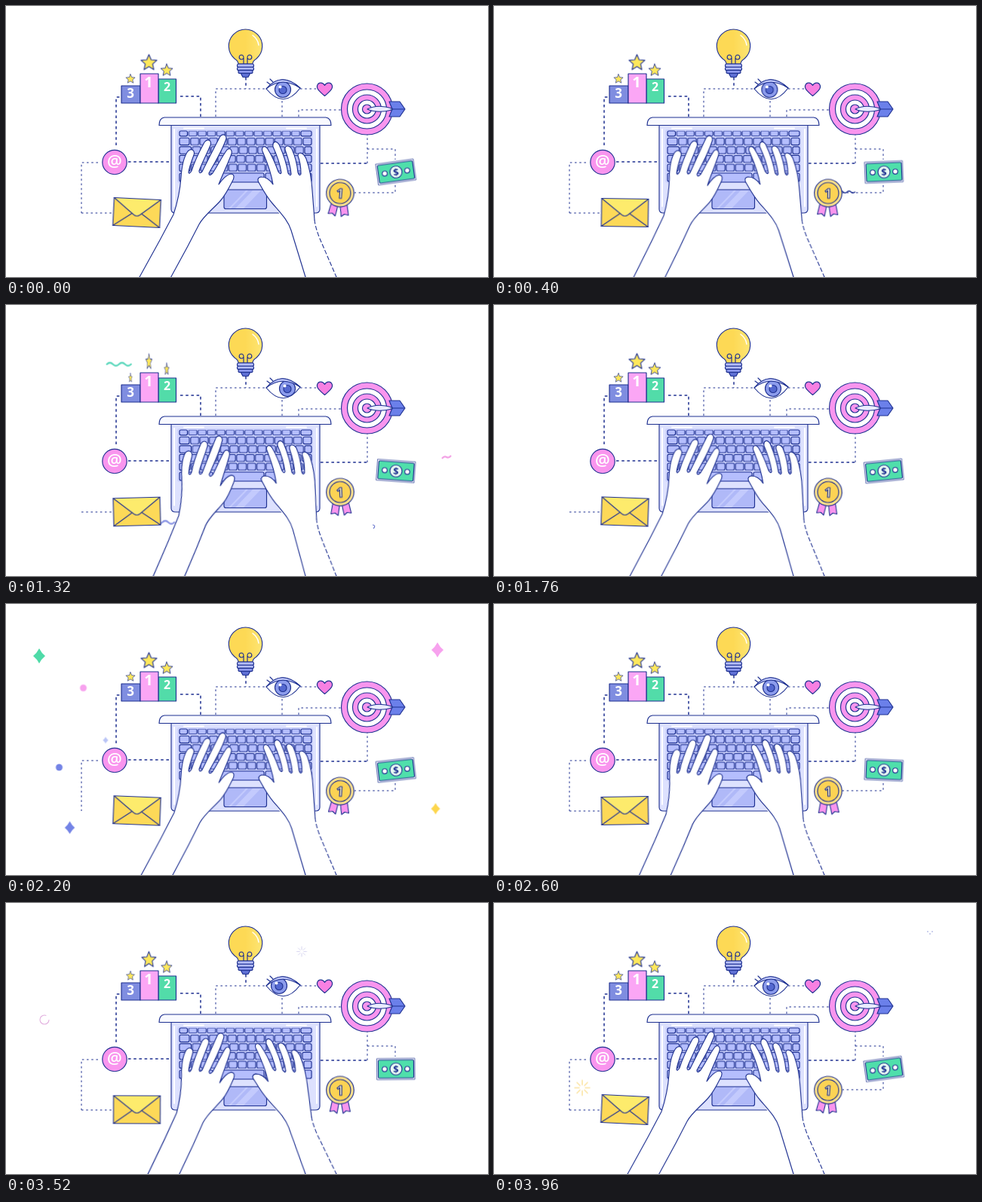
An HTML page without scripts that plays this animation: 639x360 px, repeating every 4000 ms.

```html
<!DOCTYPE html>
<html lang="en">
<head>
<meta charset="utf-8">
<title>Typing hands</title>
<style>
html, body { margin: 0; width: 100%; height: 100%; overflow: hidden; background: #fff; }
svg { display: block; width: 100%; height: 100%; --ink: #1f3191; }
.ink { stroke: var(--ink); stroke-width: 1.15; stroke-linejoin: round; stroke-linecap: round; }
.line { fill: none; }
text { font-family: "Open Sans", "Noto Sans", sans-serif; font-weight: 700; text-anchor: middle; fill: #fff; }

/* dashed connectors */
.dash { fill: none; stroke: var(--ink); stroke-width: 1; stroke-dasharray: 2.6 3.6; }
.bold { stroke-width: 1.5; stroke-dasharray: 3.6 3.6; }
.flick { animation: 4s step-end infinite; }
.fa { animation-name: fa; }
.fb { animation-name: fb; }
.fc { animation-name: fc; }
.fd { animation-name: fd; }
@keyframes fa { 0%, 45%, 84% { opacity: 1 } 27%, 68% { opacity: 0 } }
@keyframes fb { 0%, 62% { opacity: 1 } 50% { opacity: 0 } }
@keyframes fc { 0%, 70% { opacity: 1 } 28% { opacity: 0 } }
@keyframes fd { 0%, 50%, 95% { opacity: 1 } 28%, 84% { opacity: 0 } }

/* swaying icons: from --a to its opposite and back */
.sway { animation: sway 1s cubic-bezier(.37, 0, .63, 1) infinite alternate; }
@keyframes sway { from { transform: rotate(var(--a)) } to { transform: rotate(calc(-1 * var(--a))) } }

.star { transform-box: fill-box; transform-origin: center; fill: #fde85c; animation: spin 2s linear infinite; }
@keyframes spin { 0%, 58.5% { transform: rotateY(0) } 79%, 100% { transform: rotateY(180deg) } }

/* hands lean: the left one slides its forearm, the right one keeps it still */
.left { transform-origin: 258px 219px; animation: left 1s cubic-bezier(.37, 0, .63, 1) infinite alternate; }
@keyframes left { to { transform: translateY(4px) skewX(8.9deg) } }
.right { transform-origin: 410px 360px; animation: right 4s ease-in-out infinite; }
@keyframes right {
  0%, 100% { transform: none }
  19% { transform: skewX(1deg) }
  33% { transform: skewX(-2deg) }
  55%, 76% { transform: skewX(-.6deg) }
  88% { transform: skewX(3deg) }
}
.iris { animation: look 4s ease-in-out infinite; }
@keyframes look {
  0%, 55%, 76%, 100% { transform: none }
  19% { transform: translateX(-3px) }
  33% { transform: translateX(6px) }
  88% { transform: translate(-5px, -1px) }
}

/* sparks: --t is the moment of full size, --x --y the starting offset */
.pop, .glide { opacity: 0; animation: pop 4s ease-out infinite; animation-delay: calc(var(--t) * 1ms - 4400ms); }
.glide { animation-name: glide; animation-timing-function: linear; animation-delay: calc(var(--t) * 1ms - 4700ms); }
@keyframes pop {
  0% { opacity: 0; transform: translate(var(--x, 0), var(--y, 0)) scale(.2) }
  3% { opacity: 1 }
  10%, 11% { opacity: 1; transform: none }
  11.1%, 100% { opacity: 0; transform: none }
}
@keyframes glide {
  0% { opacity: 1; transform: translate(var(--x, 0), var(--y, 0)) }
  17.5% { opacity: 1; transform: none }
  19% { opacity: 0; transform: none }
  100% { opacity: 0 }
}
</style>
</head>
<body>
<svg viewBox="0 0 639 360" preserveAspectRatio="none">
<defs>
  <pattern id="keys" width="12.4" height="20" patternUnits="userSpaceOnUse">
    <rect x=".8" y=".6" width="10.8" height="9.4" rx="2" fill="#b5befd" stroke="#1f3191" stroke-width="1.1"/>
  </pattern>
  <rect id="row" width="148.8" height="11" fill="url(#keys)"/>
  <path id="star" d="M0-11 3-4 10.5-3.4 4.9 1.6 6.5 9 0 5-6.5 9-4.9 1.6-10.5-3.4-3-4Z"/>
  <path id="gem" d="M0-10Q3-4 8 0Q3 4 0 10Q-3 4-8 0Q-3-4 0-10Z"/>
  <path id="wave" d="M-16 0q4-4 8 0t8 0 8 0 8 0" fill="none" stroke-width="2.4" stroke-linecap="round"/>
  <path id="rays" d="M0-4V-10M0 4V10M-4 0H-10M4 0H10M-3-3-7-7M3 3 7 7M3-3 7-7M-3 3-7 7" stroke-width="1.5" stroke-linecap="round"/>
  <path id="ribbon" class="ink" d="M1 14 4 31 8 27.5 13.5 28.500 10 12Z" fill="#f995ee"/>
  <linearGradient id="glass"><stop offset=".5" stop-color="#fdd955"/><stop offset="1" stop-color="#fde573"/></linearGradient>
</defs>
<rect width="639" height="360" fill="#fff"/>

<!-- connectors -->
<path class="dash bold" d="M146 185V121H154M231 120H258V148M162 207H217M318 95V110M417 209H479"/>
<path class="dash" d="M278 147V110H345M390 110H411M366 126V147M388 147V138H445M479 209V171"/>
<path class="dash flick fa" d="M122 208H100V275"/>
<path class="dash flick fb" d="M100 275H141"/>
<path class="dash flick fc" d="M479 190H516V204"/>
<path class="dash flick fd" d="M516 238V248H462"/>

<!-- gliding squiggles -->
<g transform="translate(584 202)"><path class="glide line" style="--t:1320; --x:-45px" d="M-6 2q3-4 6-2t6-2" stroke="#f3a2e6" stroke-width="2.200"/></g>
<g transform="translate(149 78)"><g class="glide" style="--t:1340; --x:26px; --y:24px"><use href="#wave" stroke="#5ed8bd"/></g></g>
<g transform="translate(208 289)"><g class="glide" style="--t:1340; --x:-30px; --y:-12px"><use href="#wave" stroke="#8c96e4"/></g></g>
<g transform="translate(484 247)"><g class="glide" style="--t:800; --x:-28px"><use href="#wave" transform="scale(.65 .6)" stroke="#1f3191"/></g></g>
<path class="pop line" style="--t:1310" d="M486 292q5 1 1 5" stroke="#6f7ccf" stroke-width="1.200"/>

<!-- laptop -->
<path class="ink" d="M219 157H416V270Q416 275 410 275H225Q219 275 219 270Z" fill="#dde1fe"/>
<path class="line" d="M223 164V266M412 164V266M236 162.500H262M372 162.500H398" stroke="#fff" stroke-width="2" stroke-linecap="round"/>
<path class="ink" d="M210 148H424Q431 149 431 158.500H203Q203 149 210 148Z" fill="#f8f9ff"/>
<rect x="227" y="164" width="180" height="71" rx="3" fill="#ced4fe"/>
<g class="ink" fill="#b5befd">
  <rect x="230" y="166" width="10.500" height="6.800" rx="2"/><rect x="391" y="166" width="14" height="6.800" rx="2"/>
  <rect x="230" y="175.200" width="13" height="9.400" rx="2"/><rect x="394" y="175.200" width="11" height="9.400" rx="2"/>
  <rect x="230" y="186.800" width="15.500" height="9.400" rx="2"/><rect x="396" y="186.800" width="9" height="9.400" rx="2"/>
  <rect x="230" y="198.400" width="12" height="9.400" rx="2"/><rect x="393" y="198.400" width="12" height="9.400" rx="2"/>
  <rect x="230" y="210" width="14" height="9.400" rx="2"/><rect x="395" y="210" width="10" height="9.400" rx="2"/>
  <rect x="230" y="222" width="18" height="11" rx="2"/><rect x="250" y="222" width="24" height="11" rx="2"/>
  <rect x="276" y="222" width="66" height="12" rx="2"/><rect x="344" y="222" width="24" height="11" rx="2"/>
  <rect x="370" y="222" width="35" height="11" rx="2"/>
</g>
<use href="#row" transform="translate(241.400 165.600) scale(1 .72)"/>
<use href="#row" transform="translate(244 174.600)"/>
<use href="#row" transform="translate(246.400 186.200)"/>
<use href="#row" transform="translate(243 197.800)"/>
<use href="#row" transform="translate(245 209.400)"/>
<rect class="ink" x="289" y="244" width="56.500" height="25.500" rx="2.500" fill="#b0b9f8"/>
<path d="M304 269 327 245H338L315 269ZM295 269 318 245H321L298 269Z" fill="#c3cafd"/>

<!-- bulb -->
<g class="ink">
  <path d="M308 77Q308 73 303 70A22.200 22.200 0 1 1 332 70Q327 73 327 77Z" fill="url(#glass)"/>
  <path class="line" d="M315 77V69M320 77V69M315 69a3 3 0 1 1-3-4q3 0 3 4M320 69a3 3 0 1 0 3-4q-3 0-3 4"/>
  <path class="line" d="M327 39q7 5 8 13" style="stroke:#fff; stroke-width:1.500"/>
  <path d="M311 89H324L321 94.500H314Z" fill="#5f70d4"/>
  <rect x="306.500" y="77" width="22" height="4.200" rx="2" fill="#b5befd"/>
  <rect x="306.500" y="81.200" width="22" height="4.200" rx="2" fill="#b5befd"/>
  <rect x="308" y="85.400" width="19" height="4" rx="2" fill="#8e9af0"/>
</g>

<!-- podium -->
<g class="ink">
  <rect x="153" y="106" width="25" height="23" fill="#7f8de0"/>
  <rect x="202" y="97" width="23.500" height="32" fill="#52dca9"/>
  <rect x="178" y="90" width="24" height="39" fill="#fba6f5"/>
  <g transform="translate(189.500 75.500)"><use href="#star" class="star"/></g>
  <g transform="translate(165 97) scale(.58)"><use href="#star" class="star"/></g>
  <g transform="translate(213 85.500) scale(.76)"><use href="#star" class="star"/></g>
</g>
<text x="165" y="122" font-size="17">3</text>
<text x="189" y="108" font-size="20">1</text>
<text x="213.500" y="113" font-size="16">2</text>

<!-- at sign -->
<circle class="ink" cx="144" cy="207.500" r="16.200" fill="#f995ee"/>
<text x="144" y="213.500" font-size="22" font-weight="400" style="font-weight:600">@</text>

<!-- eye -->
<g class="ink">
  <path d="M345 110Q365 86 390 109Q368 138 345 110Z" fill="#fff"/>
  <g class="iris">
    <circle cx="367" cy="111" r="10.500" fill="#8c9cec"/>
    <circle cx="367" cy="111.500" r="5" fill="#5468d0"/>
    <circle cx="363.500" cy="107.500" r="2" fill="#fff" stroke="none"/>
  </g>
  <path d="M345 110Q365 86 390 109Q366 93 345 110Z" fill="#c0c8fb"/>
  <path class="line" d="M350 104 346 101M354 101 350 97"/>
</g>

<!-- heart -->
<path class="ink" d="M422.500 119.500C416 114 411.500 110 412.500 106C414 101 420 101 422.500 105.500C425 101 431 101 432.500 106C433.500 110 429 114 422.500 119.500Z" fill="#f880e2"/>

<!-- target -->
<g class="ink" fill="#f995ee">
  <circle cx="478.500" cy="137" r="34"/>
  <circle cx="478.500" cy="137" r="26" fill="#fff"/>
  <circle cx="478.500" cy="137" r="19"/>
  <circle cx="478.500" cy="137" r="12" fill="#fff"/>
  <circle cx="478.500" cy="137" r="6"/>
  <path d="M512 137 508 127H522L529 137 522 147H508Z" fill="#6b80ea"/>
  <path d="M479 137Q492 130 512 136V138Q492 143 479 137Z" fill="#e9ecff"/>
  <path class="line" d="M510 137H528"/>
</g>

<!-- banknote -->
<g transform="translate(517 220.500)"><g class="sway" style="--a:-7.800deg">
  <rect class="ink line" x="-25" y="-14" width="50" height="28" style="stroke-width:.7"/>
  <rect class="ink" x="-23.500" y="-12" width="47" height="24" rx="1.500" fill="#4fdfab"/>
  <circle class="ink" r="8" fill="#e9fbf4"/>
  <circle class="ink" cx="-15" r="3.300" fill="#fff"/>
  <circle class="ink" cx="15" r="3.300" fill="#fff"/>
  <text y="4.700" font-size="13" style="fill:var(--ink)">$</text>
</g></g>

<!-- medal -->
<g transform="translate(443 248.500)"><g class="sway" style="--a:5deg">
  <use href="#ribbon"/><use href="#ribbon" transform="scale(-1 1)"/>
  <circle class="ink" r="18.300" fill="#fde28c"/>
  <circle class="ink" r="14" fill="#fcd354"/>
  <text class="ink" y="6.500" font-size="18" style="fill:#fdeeb4">1</text>
</g></g>

<!-- envelope -->
<g transform="translate(173.500 274.500)"><g class="sway" style="--a:2.800deg">
  <rect class="ink" x="-31" y="-18.500" width="62" height="37" fill="#fdd958"/>
  <path class="ink line" d="M-31 18.500-6 1M31 18.500 6 1"/>
  <path class="ink" d="M-31-18.500-4 3Q0 6 4 3L31-18.500Z" fill="#fdeb6c"/>
</g></g>

<!-- hands -->
<g class="left">
  <path class="ink" fill="#fff" d="M155 400 204 311 222 277C227 262 231 242 232 228C233 212 236 200 241 193C246 188 251 192 249 198C246 206 243 214 242 221Q243 224 246 219C250 206 257 192 263 181C268 175 273 179 271 185C266 197 260 208 256 219Q256 224 260 220C267 206 276 188 284 173C289 168 294 173 291 179C286 193 277 208 269 222Q269 227 274 222C281 211 287 199 293 191C298 187 301 193 298 199C293 212 287 224 282 237C287 230 293 224 298 223C303 223 303 228 300 233C295 243 291 251 284 259C274 270 262 279 256 290L241 319 197 400"/>
</g>
<g class="right">
  <path fill="#fff" d="M452 400 438 360 410 290 400 240 360 250 353 262 377 297 409 400Z"/>
  <path class="ink" fill="#fff" d="M409 284 406 245C405 228 402 214 398 203C394 194 387 193 387 199C390 207 391 215 391 223Q389 227 387 221C386 210 383 199 379 190C375 184 369 185 370 191C374 202 377 212 378 223Q377 227 374 222C372 209 367 195 362 184C358 178 353 180 354 187C359 198 363 209 365 221Q364 225 361 220C357 209 352 198 347 190C343 184 338 187 340 193C345 205 351 218 354 237C350 231 344 227 338 227C333 228 333 232 336 236C341 245 346 254 353 262C364 275 374 285 378 298L397 360 409 400"/>
  <path class="line" d="M409 284Q410 294 416 309L438 360 446 380" stroke="#1f3191" stroke-width="1.100" stroke-dasharray="6 2.500"/>
</g>

<!-- gems and dots -->
<g transform="translate(44 69)"><use href="#gem" class="pop" style="--t:2200; --x:50px; --y:15px" fill="#4fdba8"/></g>
<g transform="translate(572 61)"><use href="#gem" class="pop" style="--t:2200; --x:-40px; --y:30px" fill="#f7a2ee"/></g>
<g transform="translate(569.500 272) scale(.75)"><use href="#gem" class="pop" style="--t:2200; --x:-50px; --y:-30px" fill="#fdd64d"/></g>
<g transform="translate(84.500 297) scale(.84)"><use href="#gem" class="pop" style="--t:2200; --x:50px; --y:-20px" fill="#7484e6"/></g>
<g transform="translate(132 181) scale(.45)"><use href="#gem" class="pop" style="--t:2200; --x:20px; --y:30px" fill="#b9c4f6"/></g>
<g transform="translate(102.500 111.500)"><circle class="pop" style="--t:2200; --x:40px" r="4.500" fill="#f7a2ee"/></g>
<g transform="translate(70.500 217)"><circle class="pop" style="--t:2200; --x:40px" r="4.500" fill="#7484e6"/></g>

<!-- outlined sparks -->
<g fill="none" stroke-width="1.100">
  <g transform="translate(261 47.500)"><rect class="pop" style="--t:3030" x="-2.500" y="-2.500" width="5" height="5" stroke="#f7e6b8"/></g>
  <g transform="translate(327 121.500)"><circle class="pop" style="--t:3030" r="5" stroke="#8d97cf"/></g>
  <g transform="translate(506.500 251)"><circle class="pop" style="--t:3030" r="4.500" stroke="#8fb4ea"/></g>
  <g transform="translate(280 310.500)"><use href="#gem" class="pop" style="--t:3030" stroke="#7b88cc" stroke-dasharray="4 2"/></g>
  <g transform="translate(455 287)"><path class="pop" style="--t:3030" d="M-6-4-1 6 7-6" stroke="#f3c58e"/></g>
  <g transform="translate(51 155)"><circle class="pop" style="--t:3510" r="6" stroke="#e2b0df" stroke-dasharray="30 8"/></g>
  <g transform="translate(392 64.500) scale(.65)"><use href="#rays" class="pop" style="--t:3510" stroke="#d5d3ef"/></g>
  <g transform="translate(117 245.500)"><use href="#rays" class="pop" style="--t:3950" stroke="#fbe3a0"/></g>
  <g transform="translate(578 40)"><path class="pop" style="--t:3950" d="M-4-2h2M2-2h2M-1 1h2" stroke="#9aa3dc"/></g>
</g>
</svg>
</body>
</html>
```
